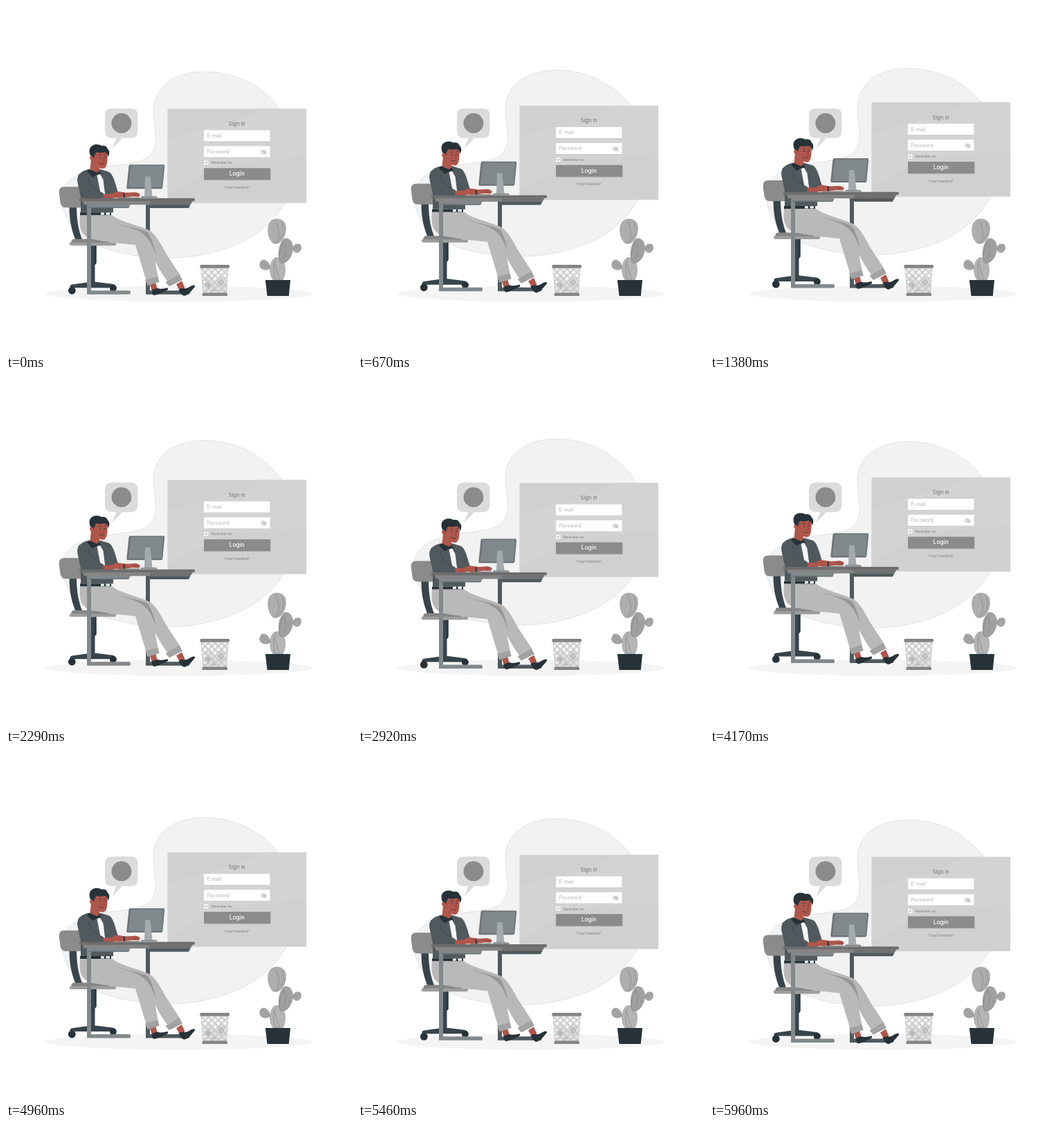
Write an HTML page that moves like this. It is 500 by 500 pixels and loops after 6000 ms.

```html
<!DOCTYPE html>
<html lang="en">
<head>
<meta charset="utf-8">
<title>Sign in</title>
<style>
  html, body { margin: 0; width: 100%; height: 100%; overflow: hidden; background: #fff; }
  svg { display: block; width: 100vw; height: 100vh; }
  text { font-family: Inter, "Open Sans", sans-serif; }
  .skin { fill: #b0564b; }
  .ink { fill: #263238; }
  .shirt { fill: #50595d; }
  .steel { fill: #82898c; }
  .iron { fill: #50595d; }
  .line { fill: none; stroke-linecap: round; stroke-linejoin: round; }
</style>
</head>
<body>
<svg viewBox="0 0 500 500">
  <defs>
    <pattern id="mesh" width="9.5" height="9.5" patternUnits="userSpaceOnUse" x="283" y="380">
      <path d="M0 0L9.5 9.5M9.5 0L0 9.500" stroke="#c9c9c9" stroke-width="2"/>
    </pattern>
    <clipPath id="panelClip"><path d="M233.5 148.5H434V284.6H233.5Z"/></clipPath>
  </defs>

  <g id="blob">
    <path d="M286 95C338 95 374 120 396 149C426 188 432 248 403 285C385 315 358 334 332 345C300 358 268 364 236 364C195 364 150 357 120 340C92 322 78 295 82 270C86 248 110 239 140 233C172 227 204 229 213 209C219 196 215 180 213.500 160C209 120 240 95 286 95Z"
      fill="#f2f2f2" stroke="#d2d2d2" stroke-width=".6"/>
  </g>
  <ellipse cx="250" cy="416" rx="193.3" ry="11.4" fill="#f4f4f4"/>

  <g id="bubble">
    <path d="M153 148.5H180.500Q190.200 148.500 190.200 158V181Q190.200 190.500 180.500 190.500H168L154 205.300L160 190.500H153Q143.300 190.500 143.300 181V158Q143.300 148.500 153 148.500Z"
      fill="#dbdbdb" stroke="#d0d0d0" stroke-width=".4"/>
    <circle cx="166.900" cy="169.400" r="14.400" fill="#8b8b8b"/>
  </g>

  <g id="panel">
    <path d="M233.500 148.500H434V284.600H233.500Z" fill="#d0d0d0"/>
    <g clip-path="url(#panelClip)">
      <path d="M368 148C345 168 310 172 280 180C262 184 247 192 233 194V270C262 260 290 232 330 227C365 223 400 221 434 218V148Z" fill="#d3d3d3"/>
    </g>
    <g fill="#c3c3c3">
      <path d="M286.600 180.100H382V196.100H286.600ZM286.600 203.100H382V219.100H286.600Z"/>
      <path d="M287 235H382.600V252H287Z" fill="#aaa"/>
    </g>
    <path d="M286 179.500H381.500V195.500H286ZM286 202.500H381.500V218.500H286ZM286.300 223.500H292.300V229.300H286.300Z" fill="#fff"/>
    <path d="M286 234.200H381.800V251H286Z" fill="#8b8b8b"/>
    <path class="line" d="M287.900 226.300L289 227.600L290.800 225.200" stroke="#777" stroke-width=".8"/>
    <g class="line" stroke="#949494" stroke-width=".6">
      <path d="M368.200 211Q372.500 205.800 376.900 211Q372.500 216.200 368.200 211ZM369.400 207.600L376.200 214.300"/>
      <circle cx="372.600" cy="211" r="1.600"/>
    </g>
    <g text-anchor="middle">
      <text x="333.700" y="172.700" font-size="7.600" fill="#737373">Sign in</text>
      <text x="333.800" y="245.200" font-size="8.400" font-weight="500" fill="#fff">Login</text>
      <text x="333.800" y="263.800" font-size="4.150" fill="#777">Forgot Password?</text>
    </g>
    <text x="290.400" y="189.700" font-size="7.100" fill="#b3b3b3">E-mail</text>
    <text x="290.400" y="212.900" font-size="7" fill="#b3b3b3">Password</text>
    <text x="296.800" y="228.400" font-size="4.350" fill="#777">Remember me</text>
  </g>

  <g id="worker">
    <g id="chair">
      <path d="M91.500 289H102C102 309 105 325 110.500 338L101 339C94 322 91.500 308 91.500 289Z" fill="#37444b"/>
      <path d="M84 261H108V291H86Q80 291 78.500 284L76.700 270Q76 261 84 261Z" fill="#8b8b8b"/>
      <path d="M97 336.500H150V343H94Q94 338 97 336.500Z" fill="#858585"/>
      <path d="M122.500 346H130.500V371L128.500 374V402H122.500Z" fill="#37444b"/>
      <path d="M128.500 346H130.500V371L128.500 374Z" fill="#263238"/>
      <path d="M92 341.500H159V344Q159 346 157 346H94Q92 346 92 344Z" fill="#9d9d9d"/>
      <path d="M92.500 408V404.500Q93 402.500 97 402L122 398.500H130L154 401.500Q159 402.500 160 408L154 409L152 407H100Z" fill="#37444b"/>
      <circle class="ink" cx="95.300" cy="411" r="5.400"/>
      <circle class="ink" cx="154.800" cy="407.500" r="4.900"/>
    </g>

    <path class="iron" d="M202 286H267L264 291.800H208V411H263Q265.500 411 265.500 414T263 416.500H202Z"/>

    <g id="legs">
      <path class="skin" d="M246 402L254 397L258.500 407L251 411ZM208 402L216.500 400L219 410L211 412Z"/>
      <path class="ink" d="M249.500 409.500Q254 406.500 258.500 408C264 407.500 267 403.500 271.500 403.200Q273.500 403.300 273 405.500C268 411 264 417.500 257.500 418.600Q253 418 249.500 409.500Z"/>
      <path class="ink" d="M210.500 410.500Q214 408.500 218.500 407.500C225 409.800 229 407.500 233 407Q234.800 407.400 233.700 410C227 413 219 417.500 213 417.800Q210.500 415 210.500 410.500Z"/>
      <path d="M140 303L157 306C178 314 197 319 207 324C217 330 224 344 231 357L252 389L235 400C223 385 213 364 204 347L160 331Z" fill="#b8b8b8"/>
      <path d="M107 302H154C158 308 186 316 200 324C207 328 209 336 211 346L220 393L203 398L187 345C165 343 140 340 126 337C109 333 105 322 107 302Z" fill="#b9b9b9"/>
      <path d="M152 312C172 318 194 321 205 327C211 335 213 345 217 359L209 342C204 333 196 325 178 319.500Z" fill="#969696"/>
      <path d="M230.500 399L250.500 387.500L255 395.500L236 405ZM201 395.500L219.500 390.500L221.700 398.500L204.500 404Z" fill="#a2a2a2"/>
    </g>

    <g id="torso">
      <path class="shirt" d="M118 236C107 239 101.500 245 103.500 255L108 276V298H155V274L161.500 268C158 256 155 243 149 239.500L134 235Z"/>
      <path d="M131.500 244.500L136 242.500L140.500 251L143.500 275H137.500Z" fill="#f7f7f7"/>
      <path d="M107 298H152V302H107Z" class="ink"/>
      <path d="M137 298.200H141.800V301.500H137ZM144.500 298.200H150V301.500H144.500Z" fill="#f5f5f5"/>
      <path class="skin" d="M123 221L135 230L134.500 241L128 243L121.500 236Z"/>
      <path class="ink" d="M120.500 235.500L131.500 240.500L135 237.500L138 243L133.500 242.500L125 247L117 238.500Z"/>
    </g>

    <g id="head" transform="translate(.8 .4)">
      <path class="skin" d="M122.500 207L144 204C146.500 212 146.300 223 144.200 230Q142.300 235 137 234C129 232.500 124 228 122.500 221Z"/>
      <circle class="skin" cx="123.700" cy="219" r="3.300"/>
      <path class="ink" d="M121.500 216C118.500 210 119.500 204 123.500 201.500C128 198.300 134 199.300 137.500 201.500C141 200.200 145.500 202.500 146 206C149 207.500 149.500 214 146.500 217.300C146.300 213 144 210.500 140.500 210.500C136 212.500 131.500 210.500 129.500 211C127.500 213 127 217 125.800 219.500C125 216.500 123 215.500 121.500 216Z"/>
      <circle class="ink" cx="135.200" cy="218.700" r=".85"/>
      <circle class="ink" cx="142.400" cy="217.800" r=".85"/>
      <g class="line" stroke="#263238" stroke-width=".7">
        <path d="M132.500 215.800Q134.500 213.700 136.500 214.600M141.300 214Q143 213 144.500 214.500"/>
        <path d="M139.500 217.500L141.500 223L139 223.700" stroke="#813d35"/>
        <path d="M133 226Q136.500 229.300 141 226.800" stroke-width=".7"/>
      </g>
    </g>

    <g id="desk">
      <path class="steel" d="M117 286H180L177.500 291.800H123V411H178Q180 411 180 414T178 416.500H117Z"/>
      <path d="M120 291.800H177V290.500H120Z" fill="#697074"/>
      <path d="M111 281H270Q268 287 264 287H115Q111 287 111 281Z" fill="#858585"/>
      <path d="M208 282H268Q267 287 264 287H208Z" fill="#717171"/>
      <path d="M106 277.600H271.500Q273 277.600 273 279.500T271.500 281.800H106Z" fill="#6d6d6d"/>
    </g>

    <g id="monitor">
      <path d="M180 229H227.500Q229.500 229 229.200 231L226.300 262Q226 264 224 264H176Q174 264 174.300 262L177.500 231Q177.800 229 180 229Z" fill="#6b7376"/>
      <path d="M180.500 230.500H227.300L224.700 261.800H176.800Z" fill="#81888b"/>
      <path d="M201 246H208.500L211.500 275H200Z" fill="#a4aaac"/>
      <path d="M194 277.600Q194 275 198 274.600H215Q219 275 219 277.600Z" fill="#8c9396"/>
      <path d="M162 276.200H193V277.700H162Z" fill="#858585"/>
    </g>

    <g id="arms">
      <path class="skin" d="M156 267L174 269.500L184 269C189 268.300 193.500 270.500 193.800 272.500L192 275L152 274Z"/>
      <path class="shirt" d="M145 243C154 244 157 259 161.500 267L152 271L144 267Z"/>
      <path class="skin" d="M139 271.500L166 271L181 270C187 269.300 191 271.500 193.500 273L192 275.200L182 275L172 276.500L140 277.600Z"/>
      <path class="shirt" d="M105 243C113 239 120 248 124 261L141 270.500L140.500 277.600H116C108 270 104.500 257 103.500 250Z"/>
      <path class="line" d="M119 248C121 257 124 262 134 267" stroke="#3b464b" stroke-width=".8"/>
      <path d="M169.300 270.200L171.300 269.900L172 276.500L170 276.800Z" class="ink"/>
      <path class="line" d="M183 271.200L190.500 272.300M183 273.200L190 274" stroke="#813d35" stroke-width=".5"/>
    </g>
  </g>

  <g id="bin">
    <path d="M282 379H321L318.500 415H285Z" fill="#fafafa"/>
    <path d="M287 394L295 389L302 399L309 390L318 395L317.500 414.500H287Z" fill="#e0e0e0"/>
    <path d="M287 402L292 397L297 403L292 409ZM306 399L311 394L316 399L311 405ZM296 412L301 406L306 412Z" fill="#b4b4b4"/>
    <path d="M282 379H321L318.500 415H285Z" fill="url(#mesh)" stroke="#c9c9c9"/>
    <rect x="280.300" y="374" width="42.700" height="4.700" rx="1.500" fill="#858585"/>
    <rect x="283.500" y="414.500" width="36.500" height="4.500" rx="1.500" fill="#858585"/>
  </g>

  <g id="cactus" stroke="#8e8e8e" stroke-width=".5">
    <g fill="#a5a5a5">
      <path d="M414 351C415 345 421 342 425.500 345C428 350 425.500 356 420 356.500Q416 356 414 351Z"/>
      <path d="M382 379C377 383 369 382 366.800 376C366 369 370 366 375 367.500Q381 371 382 379Z"/>
    </g>
    <path d="M386 396C380 388 380 373 386 366C391 361 399 364 402 372C405 381 403 390 400 396Z" fill="#b4b4b4"/>
    <path d="M396 371C392 360 394 346 400 338C405 333 412 337 414 345C416 355 411 367 403 371Q399 372.500 396 371Z" fill="#a0a0a0"/>
    <path d="M386 343C379 337 376 322 381 313C386 306 398 306 403 314C407 324 402 338 394 342.500Q390 344.500 386 343Z" fill="#aeaeae"/>
    <g class="line" stroke="#858585" stroke-width=".7">
      <path d="M389 342C398 334 394 318 389 311M391 342C402 332 403 322 398 312"/>
      <path d="M398 370C406 362 405 350 402 341M396 368C394 358 397 348 401 342"/>
      <path d="M390 396C385 386 386 374 390 366M395 396C392 387 390 375 387 370"/>
      <path d="M415 351Q420 350 424.500 346M381 378Q375 376 370 369"/>
    </g>
    <path d="M374.800 396H411L408.700 419H377.500Z" fill="#263238" stroke="none"/>
  </g>
</svg>

<script>
  const LIFT = 10;
  const LEAD = 50; // ms the motion is already under way when the loop begins
  const floats = [
    { id: "blob", period: 6000, rest: 0.2 },
    { id: "panel", period: 3000, rest: 0.4 },
    { id: "worker", period: 3000, rest: 0.6 },
  ].map(item => ({ ...item, node: document.getElementById(item.id) }));

  // Linear rise and fall: 0 at both ends, 1 halfway.
  const triangle = phase => 1 - Math.abs(1 - 2 * phase);

  function draw(ms) {
    for (const { node, period, rest } of floats) {
      const y = rest - LIFT * triangle(((ms + LEAD) % period) / period);
      node.setAttribute("transform", `translate(0 ${y.toFixed(3)})`);
    }
  }

  const start = performance.now();
  function tick() {
    draw(performance.now() - start);
    requestAnimationFrame(tick);
  }
  tick();
</script>
</body>
</html>
```
